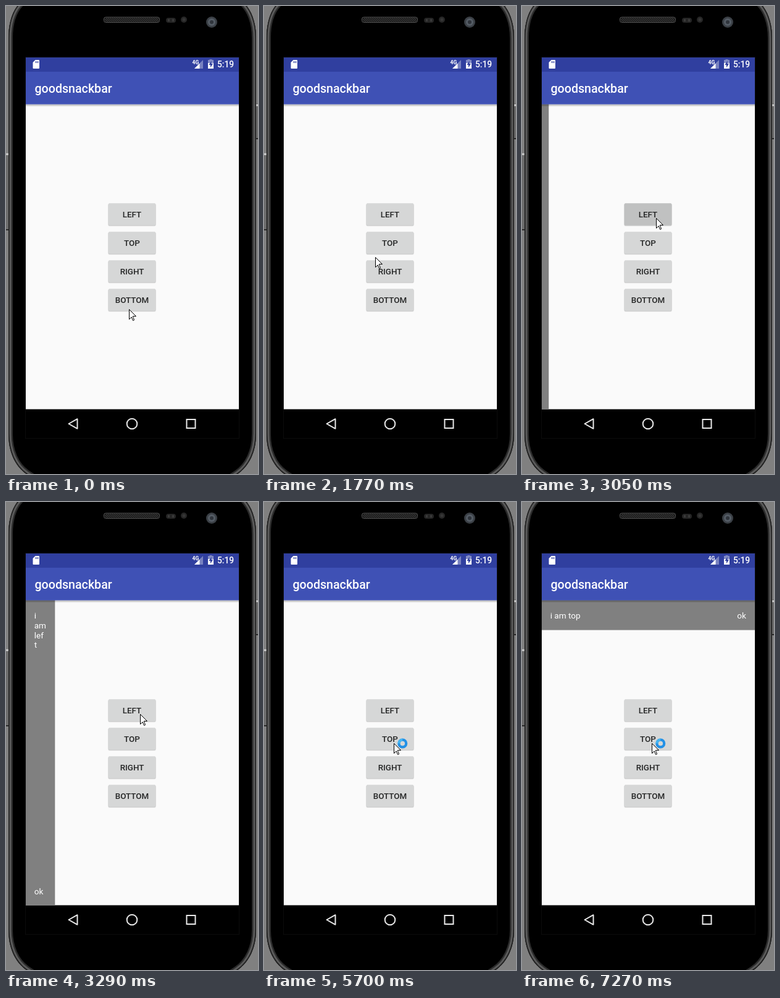
These frames come from a looping animation (408x755 px, 8000 ms). An HTML page:

```html
<!DOCTYPE html>
<html lang="en">
<head>
<meta charset="utf-8">
<title>goodsnackbar</title>
<style>
  html, body { margin: 0; width: 100%; height: 100%; overflow: hidden; background: #808080; }
  svg { display: block; width: 408px; height: 755px; font-family: Roboto, sans-serif; font-size: 13.4px; }
  .medium { font-weight: 500; }
  .rim { fill: none; }
  .buttons text { font-weight: 500; fill: #252626; text-anchor: middle; }
  .bar text { fill: #fff; font-size: 13.6px; }
  .nav { fill: none; stroke: #e9e9e9; stroke-width: 2; }

  .cursor, .busy, .bar, .ripple { animation: 8s step-end infinite; }
  .cursor { animation-name: point; }
  .busy { animation-name: busy; }
  .bar.left { animation-name: slide-left; }
  .bar.top { animation-name: slide-top; }
  .ripple { opacity: 0; }
  .ripple.left { animation-name: press-left; }
  .ripple.top { animation-name: press-top; }

  @keyframes point {
    0% { transform: translate(199px, 489px); }
    1.87% { transform: translate(196px, 444px); }
    3.37% { transform: translate(194px, 419px); }
    5.24% { transform: translate(190px, 455px); }
    6.74% { transform: translate(183px, 540px); }
    8.24% { transform: translate(179px, 630px); }
    9.74% { transform: translate(180px, 672px); }
    11.62% { transform: translate(182px, 588px); }
    13.49% { transform: translate(182px, 565px); }
    14.99% { transform: translate(177px, 520px); }
    16.49% { transform: translate(174px, 482px); }
    18.37% { transform: translate(174px, 457px); }
    20.24% { transform: translate(176px, 430px); }
    22.12% { transform: translate(180px, 405px); }
    23.99% { transform: translate(186px, 383px); }
    25.87% { transform: translate(199px, 359px); }
    27.74% { transform: translate(211px, 348px); }
    29.62% { transform: translate(217px, 342px); }
    65.62% { transform: translate(217px, 352px); }
    67.49% { transform: translate(215px, 368px); }
    69.37% { transform: translate(211px, 383px); }
    71.24%, 100% { transform: translate(210px, 389px); }
  }
  @keyframes busy {
    0% { opacity: 0; }
    67.49%, 100% { opacity: 1; }
  }
  @keyframes slide-left {
    0% { transform: translateX(-48px); }
    38.12% { transform: translateX(-36px); }
    39.62% { transform: translateX(-3px); }
    41.12% { transform: none; }
    65.62% { transform: translateX(-.7px); }
    67.49% { transform: translateX(-44px); }
    69.37%, 100% { transform: translateX(-48px); }
  }
  @keyframes slide-top {
    0% { transform: translateY(-49px); }
    87.49% { transform: translateY(-37px); }
    89.12% { transform: translateY(-3px); }
    90.87%, 100% { transform: none; }
  }
  @keyframes press-left {
    0% { opacity: 0; }
    36.62% { opacity: .14; }
    38.12% { opacity: .1; }
    39.62% { opacity: .04; }
    41.12%, 100% { opacity: 0; }
  }
  @keyframes press-top {
    0% { opacity: 0; }
    85.99% { opacity: .14; }
    87.49% { opacity: .1; }
    89.12% { opacity: .04; }
    90.87%, 100% { opacity: 0; }
  }
</style>
</head>
<body>
<svg viewBox="0 0 408 755">
  <defs>
    <clipPath id="content"><rect x="32" y="158.600" width="345" height="491.900"/></clipPath>
    <clipPath id="inside"><use href="#body"/></clipPath>
    <linearGradient id="shade" x2="0" y2="1">
      <stop stop-opacity=".3"/><stop offset="1" stop-opacity="0"/>
    </linearGradient>
    <pattern id="mesh" width="3" height="3" patternUnits="userSpaceOnUse">
      <path d="M0 3L3 0" stroke="#666" stroke-width=".8"/>
    </pattern>
    <path id="body" d="M28 -10C10 4 4 28 4 52V690C4 718 14 742 33 755L48 765H360L375 755C394 742 405 718 405 690V52C405 28 398 4 380 -10Z"/>
    <g id="button">
      <rect x="165.300" y="1" width="77.400" height="36.200" rx="2.500" opacity=".1"/>
      <rect x="165.600" y=".7" width="76.800" height="35.800" rx="2" opacity=".12"/>
      <rect x="165.600" y=".2" width="76.800" height="35.500" rx="2" fill="#d6d7d7"/>
    </g>
  </defs>

  <!-- phone -->
  <rect width="408" height="755" fill="#808080"/>
  <path d="M0 237H4V362H0ZM405 157H408V215H405Z" fill="#6c6c6c"/>
  <path d="M0 239H4M405 160H408" stroke="#ccc" stroke-width="3"/>
  <path d="M0 361H4M405 214H408" stroke="#2b2b2b" stroke-width="2"/>
  <use href="#body" fill="#000"/>
  <g class="rim" clip-path="url(#inside)">
    <use href="#body" stroke="#2c2c2c" stroke-width="14"/>
    <use href="#body" stroke="#5a5a5a" stroke-width="9"/>
    <use href="#body" stroke="#1c1c1c" stroke-width="3"/>
  </g>
  <rect x="158.500" y="18" width="90" height="8.500" rx="3" fill="#111" stroke="#555"/>
  <rect x="160" y="19" width="87" height="6.500" rx="2" fill="url(#mesh)"/>
  <rect x="259" y="19" width="16" height="8" rx="4" fill="#252525"/>
  <path d="M262 23H265M269 23H272" stroke="#3a3a3a" stroke-width="4"/>
  <circle cx="288" cy="22" r="5" fill="#262626"/>
  <circle cx="288" cy="22" r="2.500" fill="#363636"/>
  <circle cx="333" cy="26" r="9" fill="#3b4046"/>
  <circle cx="333" cy="26" r="6" fill="#545c65"/>
  <circle cx="333" cy="26" r="3" fill="#30353c"/>

  <!-- screen -->
  <rect x="31.500" y="82.500" width="346" height="615" fill="#000" stroke="#0c0c0c"/>
  <rect x="32" y="158" width="345" height="492.500" fill="#fafafa"/>

  <g class="buttons">
    <use href="#button" y="318"/><use href="#button" y="364"/>
    <use href="#button" y="410"/><use href="#button" y="456"/>
    <rect class="ripple left" x="165.600" y="318.200" width="76.800" height="35.500" rx="2"/>
    <rect class="ripple top" x="165.600" y="364.200" width="76.800" height="35.500" rx="2"/>
    <text x="204" y="341">LEFT</text>
    <text x="204" y="387">TOP</text>
    <text x="204" y="433">RIGHT</text>
    <text x="204" y="479">BOTTOM</text>
  </g>

  <g clip-path="url(#content)">
    <g class="bar left">
      <rect x="32" y="158" width="47.300" height="493" fill="#808080"/>
      <text x="45.700" y="188">i<tspan x="45.700" dy="15.800">am</tspan><tspan x="45.700" dy="15.800">lef</tspan><tspan x="45.700" dy="15.800">t</tspan></text>
      <text x="45.700" y="632.500">ok</text>
    </g>
    <g class="bar top">
      <rect x="32" y="158" width="345" height="48.600" fill="#808080"/>
      <text x="45.700" y="188">i am top</text>
      <text x="363" y="188" text-anchor="end">ok</text>
    </g>
    <rect x="32" y="158.600" width="345" height="4" fill="url(#shade)"/>
  </g>

  <rect x="32" y="106" width="345" height="52.600" fill="#3f51b5"/>
  <rect x="32" y="83" width="345" height="23" fill="#303f9f"/>
  <text class="medium" x="46.500" y="140" font-size="19.600" fill="#fff">goodsnackbar</text>

  <!-- status icons -->
  <g fill="#fff">
    <path d="M47.500 87H53Q54 87 54 88V100Q54 101 53 101H44.500Q43.500 101 43.500 100V91Z"/>
    <path d="M48 89V92M50 89V92M52 89V92" stroke="#303f9f"/>
    <path d="M319 87V101H305Z" opacity=".35"/>
    <path d="M313.500 92.500V101H305Z"/>
    <text x="301.500" y="94" font-size="8.500" font-weight="700">4G</text>
    <path d="M329.500 87V86H333.500V87H336V101H327V87Z" opacity=".4"/>
    <path d="M327 92H336V101H327Z"/>
    <path d="M332.500 88.500L328.500 95H331V99.500L335 93H332.500Z" fill="#303f9f"/>
    <text class="medium" x="342" y="99" font-size="13.800">5:19</text>
  </g>

  <!-- navigation -->
  <g class="nav">
    <path d="M101.500 674L115.500 666.200V681.800Z" stroke-linejoin="round"/>
    <circle cx="204" cy="674" r="8.300"/>
    <rect x="292.500" y="667" width="14" height="14"/>
  </g>

  <g class="cursor">
    <g class="busy" fill="none" stroke-width="4.200">
      <circle cx="14.300" cy=".5" r="5.900" stroke="#2391e6"/>
      <path d="M8.400 .5A5.900 5.900 0 0 1 14.300 -5.400" stroke="#45b5f2"/>
    </g>
    <path d="M.5 .5V16.500L4.200 12.900L6.600 18.500L8.600 17.600L6.400 12.100V11.500H11.500Z" fill="#fff" stroke="#000"/>
  </g>
</svg>
</body>
</html>
```
